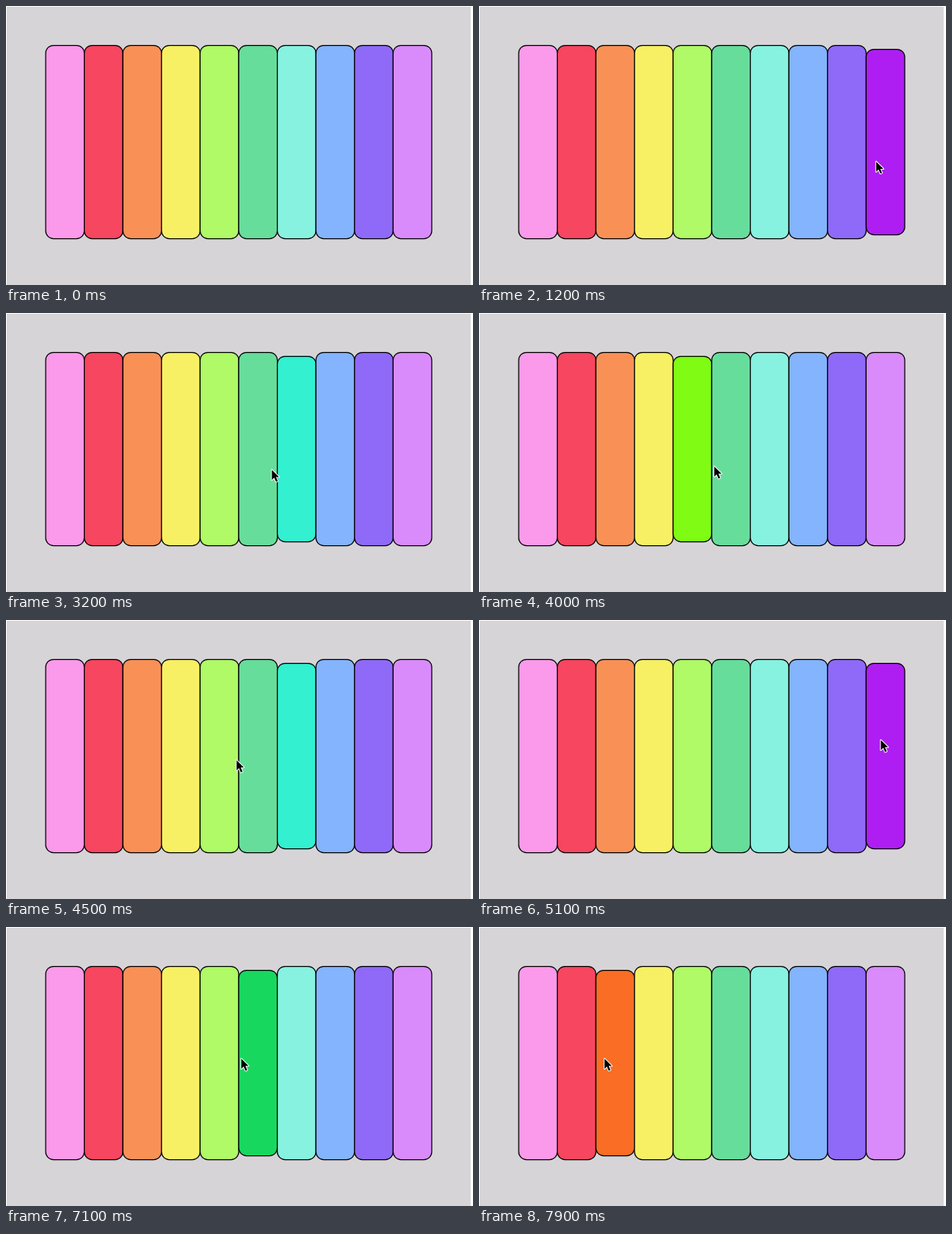
Animation, 600 px wide and 358 px high, one loop 8000 ms. Source, as an HTML page with a canvas:

```html
<!DOCTYPE html>
<html lang="en">
<head>
<meta charset="utf-8">
<title>Colour keys</title>
<style>
  html, body { margin: 0; width: 100%; height: 100%; overflow: hidden; background: #fff; }
  canvas { display: block; }
</style>
</head>
<body>
<canvas id="stage"></canvas>
<script>
const W = 600, H = 358, LOOP = 8000, STEP = 100, HOVER_LAG = 30;
const LEFT = 51, PITCH = 49.6, TOP = 50.5, HEIGHT = 248, RADIUS = 10, PRESS = 5;

// Resting and pressed colour of each key
const KEYS = [
  ['#fb9aea', '#fb50dc'], ['#f7465f', '#f50b2e'], ['#f99157', '#fa6d24'],
  ['#f8f064', '#f8e818'], ['#affa66', '#7ffb14'], ['#67dd9b', '#18d75f'],
  ['#88f2e1', '#32f0d0'], ['#84b4fd', '#2f80fa'], ['#8f6af8', '#5b31ec'],
  ['#d98bfb', '#ae1ef2']
];

// Ends of the pointer's sweeps; it eases from each to the next
const SWEEPS = [
  { t: 200, x: 7, y: 214 },
  { t: 1100, x: 528, y: 198 },
  { t: 1900, x: 55, y: 216 },
  { t: 2800, x: 528, y: 196 },
  { t: 3700, x: 76, y: 206 },
  { t: 4300, x: 528, y: 186 },
  { t: 4700, x: 64, y: 172 },
  { t: 5100, x: 516, y: 153 },
  { t: 5500, x: 554, y: 152 },
  { t: 6100, x: 484, y: 160 },
  { t: 6500, x: 62, y: 174 },
  { t: 6800, x: 525, y: 160 },
  { t: 7100, x: 302, y: 168 },
  { t: 7750, x: 152, y: 169 },
  { t: 7900, x: 161, y: 168 }
];

const ARROW = new Path2D('M0 0V13L3 10.1L5.4 15.4L7.6 14.5L5.3 9.3H9.3Z');

const canvas = document.getElementById('stage');
const ctx = canvas.getContext('2d');
const ratio = window.devicePixelRatio || 1;
canvas.width = W * ratio;
canvas.height = H * ratio;
canvas.style.width = W + 'px';
canvas.style.height = H + 'px';
ctx.scale(ratio, ratio);

function pointerAt(t) {
  const next = SWEEPS.findIndex(p => p.t > t);
  if (next === 0) return SWEEPS[0];
  if (next < 0) return SWEEPS[SWEEPS.length - 1];
  const a = SWEEPS[next - 1], b = SWEEPS[next];
  const k = (1 - Math.cos(Math.PI * (t - a.t) / (b.t - a.t))) / 2;
  return { x: a.x + (b.x - a.x) * k, y: a.y + (b.y - a.y) * k };
}

function drawKey(i, pressed) {
  const inset = pressed ? PRESS : 0;
  ctx.beginPath();
  ctx.roundRect(LEFT + i * PITCH, TOP + inset, PITCH, HEIGHT - 2 * inset, RADIUS);
  ctx.fillStyle = KEYS[i][pressed ? 1 : 0];
  ctx.fill();
  ctx.strokeStyle = '#000';
  ctx.lineWidth = 1.25;
  ctx.stroke();
}

function drawPointer({ x, y }) {
  ctx.save();
  ctx.translate(x + 0.3, y + 1);
  ctx.lineJoin = 'round';
  ctx.strokeStyle = '#fff';
  ctx.lineWidth = 2;
  ctx.stroke(ARROW);
  ctx.fillStyle = '#000';
  ctx.fill(ARROW);
  ctx.restore();
}

function draw(time) {
  const t = Math.floor((time % LOOP) / STEP) * STEP;
  const visible = t >= SWEEPS[0].t;
  const hover = visible ? Math.floor((pointerAt(t - HOVER_LAG).x - LEFT) / PITCH) : -1;

  ctx.fillStyle = '#fff';
  ctx.fillRect(0, 0, W, H);
  ctx.fillStyle = '#d6d4d7';
  ctx.fillRect(1, 1, 596, H - 1);
  KEYS.forEach((_, i) => drawKey(i, i === hover));
  if (visible) drawPointer(pointerAt(t));
}

const start = performance.now();
function tick() {
  draw(performance.now() - start);
  requestAnimationFrame(tick);
}
tick();
</script>
</body>
</html>
```
